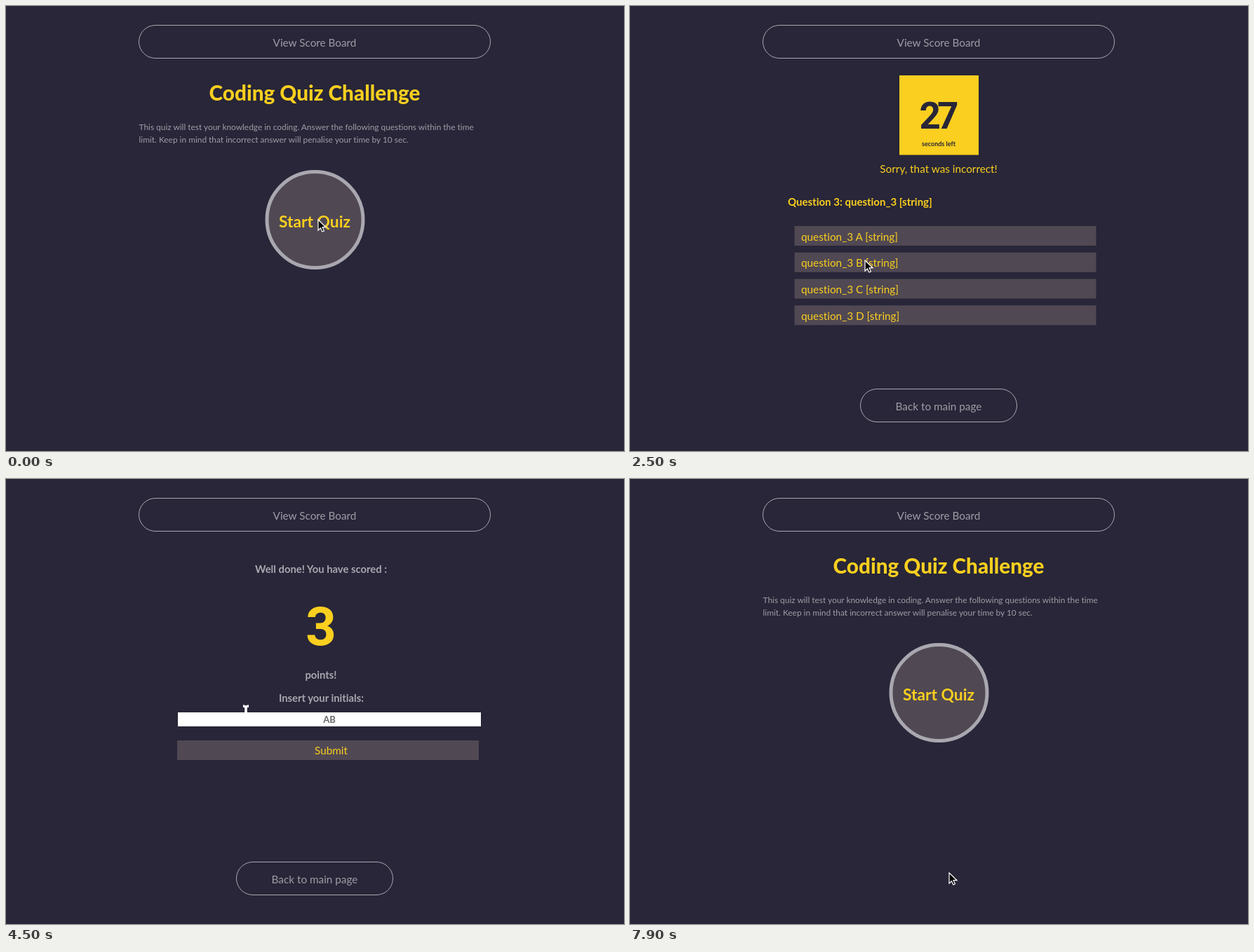
These frames come from a looping animation (881x635 px, 8000 ms). An HTML page:

```html
<!DOCTYPE html>
<html lang="en">
<head>
<meta charset="utf-8">
<title>Coding quiz</title>
<style>
  html, body { margin: 0; width: 100%; height: 100%; overflow: hidden; background: #282638; }
  svg { display: block; width: 881px; height: 635px; font-family: Lato, sans-serif; font-variant-ligatures: none; }
  text { fill: #facf1f; font-size: 15.3px; white-space: pre; }
  .mid { text-anchor: middle; }
  .soft { fill: #9f9da7; }
  .small { font-size: 11.9px; }
  .bold { font-size: 15px; font-weight: 700; }
  .grey { fill: #a9a7b0; font-size: 14.8px; }
  .title { font-size: 29.7px; font-weight: 800; }
  .digits { font-family: Roboto, sans-serif; font-weight: 700; }
  .dark { fill: #282638; }
  .pill { fill: none; stroke: #a9a7b0; }
  .bar { fill: #504853; }
  #timer { font-size: 53px; letter-spacing: -5px; }
  #startText { font-size: 22.8px; font-weight: 700; }
  #menu text { fill: #f2f2f2; font: 600 13px Inter, sans-serif; }
  #beam { fill: none; stroke: #000; stroke-width: 1.2; }
  #beam :first-child { stroke: #fff; stroke-width: 3; }
</style>
</head>
<body>
<svg viewBox="0 0 881 635">
  <g id="scoreLink">
    <rect class="pill" x="189.5" y="27.5" width="501" height="47" rx="23.5"/>
    <text class="mid soft" x="440" y="57.5">View Score Board</text>
  </g>

  <g id="home">
    <text class="mid title" x="440" y="134.5">Coding Quiz Challenge</text>
    <text class="soft small" x="189.5" y="177">This quiz will test your knowledge in coding. Answer the following questions within the time</text>
    <text class="soft small" x="189.5" y="195">limit. Keep in mind that incorrect answer will penalise your time by 10 sec.</text>
    <circle id="startDisc" cx="440.5" cy="305" r="68.5" stroke="#a9a7b0" stroke-width="5"/>
    <text id="startText" class="mid" x="440" y="315.5">Start Quiz</text>
  </g>

  <g id="quiz">
    <rect x="384" y="99" width="113" height="113.5" fill="#facf1f"/>
    <text id="timer" class="mid digits dark" x="438" y="174.5"></text>
    <text class="mid dark" x="440" y="200" style="font-size:9px;font-weight:700">seconds left</text>
    <text id="verdict" class="mid" x="440" y="238"></text>
    <text id="question" class="bold" x="225" y="284.5"></text>
    <g id="options"></g>
  </g>

  <g id="result">
    <text class="mid bold grey" x="449" y="134">Well done! You have scored :</text>
    <text class="mid digits" x="449" y="237" style="font-size:76px">3</text>
    <text class="mid bold grey" x="449" y="285">points!</text>
    <text class="mid bold grey" x="449.5" y="317.5">Insert your initials:</text>
    <g id="ring">
      <rect x="243" y="331" width="436" height="24.5" rx="3" fill="#fff"/>
      <rect x="244" y="332" width="434" height="22.5" rx="2" fill="#1c56c8"/>
    </g>
    <rect x="245" y="333" width="432" height="20" fill="#fff"/>
    <text id="entry" class="mid" x="461" y="347.5" style="font-size:13px"></text>
    <rect id="caret" y="335" width="1" height="16" fill="#777"/>
    <rect class="bar" x="244" y="373" width="430" height="28"/>
    <text class="mid" x="463.5" y="393">Submit</text>
  </g>

  <g id="board">
    <text class="mid title" x="440" y="72">Score Board</text>
    <text class="mid" x="440" y="134">Bovan - 3</text>
  </g>

  <g id="back">
    <rect class="pill" x="328.5" y="546.5" width="223" height="47" rx="23.5"/>
    <text class="mid soft" x="440" y="576.5">Back to main page</text>
  </g>

  <g id="menu">
    <rect id="menuBox" x="244" y="355" width="181.5" rx="3" fill="#222426"/>
    <g id="menuItems"></g>
  </g>

  <g id="cursor">
    <path id="arrow" d="M0 0V15l3.5-3.3 2.3 5.3 2.6-1.1-2.3-5.2h4.9z" stroke="#fff" stroke-width="1.2"/>
    <g id="beam">
      <path id="beamShape" d="M-4-8q4 0 4 3V5q0 3-4 3M4-8q-4 0-4 3M0 5q0 3 4 3M-2 2h4"/>
      <use href="#beamShape"/>
    </g>
  </g>
</svg>
<script>
const LOOP = 8000, STEP = 100, FADE = 400;
const ROW_TOP = 314, ROW_PITCH = 37.75;
const TYPING = 5200, PENALTY = 10;
const TYPED = 'Bovan';
const suggestions = ['Bovan Teng', 'Bovan', 'BT', 'AK', 'quiz', 'test'];
const CORRECT = 'Well done, that was Correct!', WRONG = 'Sorry, that was incorrect!';

// Each click opens the next state; the pointer glides there shortly before.
const clicks = [
  { time: 700, x: 445, y: 305, opens: 'quiz' },
  { time: 1700, x: 396, y: 327, opens: 'quiz', verdict: CORRECT },
  { time: 2500, x: 335, y: 363, opens: 'quiz', verdict: WRONG },
  { time: 3400, x: 387, y: 327, opens: 'quiz', verdict: CORRECT },
  { time: 4400, x: 342, y: 330, opens: 'result' },
  { time: 5000, x: 342, y: 343, opens: 'result', focused: true },
  { time: 6400, x: 472, y: 374, opens: 'board' },
  { time: 7800, x: 455, y: 562, opens: 'home' },
];
const idle = { time: 0, opens: 'home' };

const $ = id => document.getElementById(id);
const show = (id, on) => { $(id).style.display = on ? '' : 'none'; };
const clamp = v => Math.max(0, Math.min(1, v));
const ease = k => k * k * (3 - 2 * k);

const YELLOW = [250, 207, 31], PLUM = [80, 72, 83], NIGHT = [40, 38, 56];
const mix = (a, b, k) => `rgb(${a.map((v, i) => Math.round(v + (b[i] - v) * k))})`;

function paintButton(shape, label, k) {
  shape.style.fill = mix(PLUM, YELLOW, k);
  label.style.fill = mix(YELLOW, NIGHT, k);
}

$('options').innerHTML = [...'ABCD'].map((_, row) => {
  const y = ROW_TOP + row * ROW_PITCH;
  return `<rect x="234.5" y="${y}" width="430" height="28"/><text x="244" y="${y + 20.5}"></text>`;
}).join('');
const bars = $('options').querySelectorAll('rect');
const labels = $('options').querySelectorAll('text');

function pointer(t) {
  let { x, y } = clicks[0];
  for (const click of clicks) {
    const k = ease(clamp((t - click.time + 600) / 400));
    x += (click.x - x) * k;
    y += (click.y - y) * k;
  }
  return { x, y };
}

function drawHome(t, state) {
  const hover = state === idle ? clamp((t - STEP) / FADE) : 0;
  paintButton($('startDisc'), $('startText'), hover);
}

function drawQuiz(t, state, y) {
  const q = clicks.indexOf(state) + 1;
  const miss = clicks.find(click => click.verdict === WRONG);
  $('timer').textContent = 30 - Math.floor((t - 750) / 440 + 1e-6) - (t > miss.time ? PENALTY : 0);
  $('verdict').textContent = state.verdict || '';
  $('question').textContent = `Question ${q}: question_${q} [string]`;

  const hovered = Math.floor((y - ROW_TOP) / ROW_PITCH);
  const hover = clamp((t - state.time - STEP) / FADE);
  labels.forEach((label, row) => {
    label.textContent = `question_${q} ${'ABCD'[row]} [string]`;
    paintButton(bars[row], label, row === hovered ? hover : 0);
  });
}

function drawResult(t, state) {
  const typed = TYPED.slice(0, Math.max(0, Math.floor((t - TYPING) / STEP)));
  const entry = $('entry');
  entry.textContent = typed || 'AB';
  entry.style.fill = typed ? '#92929a' : '#666';
  entry.style.fontWeight = typed ? 400 : 700;
  show('ring', state.focused);
  show('caret', typed);
  $('caret').setAttribute('x', 461 + entry.getComputedTextLength() / 2);

  const matches = suggestions.filter(name => name.startsWith(typed));
  $('menuBox').setAttribute('height', 15 + matches.length * 34);
  $('menuItems').innerHTML = matches.map((name, i) =>
    `<text x="255" y="${384 + i * 34}">${name}</text>`).join('');
}

const painters = { home: drawHome, quiz: drawQuiz, result: drawResult, board() {} };

function draw(t) {
  const state = clicks.findLast(click => click.time <= t) || idle;
  const page = state.opens;
  const { x, y } = pointer(t);
  for (const id in painters) show(id, id === page);
  show('scoreLink', page !== 'board');
  show('back', page !== 'home');
  show('menu', state.focused);
  painters[page](t, state, y);

  const overInput = page === 'result' && y < 355;
  const typing = t > TYPING && overInput;
  $('cursor').setAttribute('transform', `translate(${x} ${y})`);
  show('cursor', !typing);
  show('arrow', !overInput);
  show('beam', overInput);
}

const origin = performance.now();
function tick() {
  const t = (performance.now() - origin) % LOOP;
  draw(Math.floor(t / STEP) * STEP);
  requestAnimationFrame(tick);
}
tick();
</script>
</body>
</html>
```
